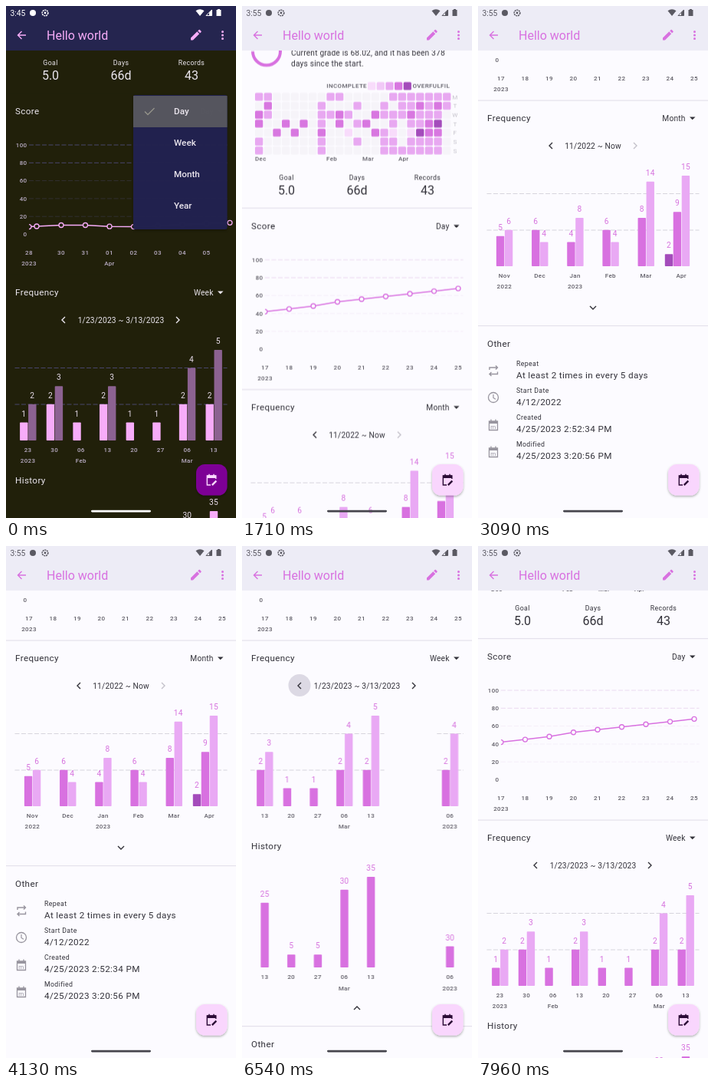
An HTML page that plays this animation: 300x667 px, repeating every 8 s.

```html
<!DOCTYPE html>
<html lang="en">
<head>
<meta charset="utf-8">
<title>Habit details</title>
<style>
  html, body { margin: 0; width: 100%; height: 100%; overflow: hidden; background: #fcfbff; }
  svg { display: block; width: 100vw; height: 100vh; font-family: Roboto, sans-serif; }
  .light { --bg: #fcfbff; --bar: #edecf6; --text: #33323a; --sub: #605e67; --pri: #d871e0; --pri2: #e9a9f4;
    --deep: #a44cbb; --line: #e4e1ec; --dash: #d3d1da; --score: #ead6ef; --fab: #f9d6fd; --ico: #2b0b36;
    --menu: #efedf7; --val: #d673de; --status: #5a5962; --pill: #45444c; --faint: #c4c1ca; }
  .dark { --bg: #21200a; --bar: #25254f; --text: #ebe6ee; --sub: #b9acc4; --pri: #f7acf9; --pri2: #8c6291;
    --deep: #d08be0; --line: #21200a; --dash: #4d4a78; --score: #4d4a78; --fab: #7d0595; --ico: #fbd9ff;
    --menu: #202050; --val: #e8dcea; --status: #ffffff; --pill: #ffffff; --faint: #6b6575; }
  text { fill: var(--text); }
  .title { font-size: 16px; fill: var(--pri); }
  .big { font-size: 16px; }
  .head { font-size: 11.7px; letter-spacing: .36px; }
  .item { font-size: 11.7px; font-weight: 500; }
  .body { font-size: 10.2px; letter-spacing: .18px; }
  .val { font-size: 10.2px; letter-spacing: .18px; fill: var(--val); }
  .label { font-size: 8.75px; letter-spacing: .36px; }
  .tiny { font-size: 8px; font-weight: 500; letter-spacing: .36px; fill: var(--sub); }
  .day { font-size: 8px; letter-spacing: .36px; fill: var(--faint); }
  .clock { font-size: 10.3px; fill: var(--status); }
</style>
</head>
<body>
<svg id="stage" viewBox="0 0 300 667" preserveAspectRatio="none">
  <defs>
    <clipPath id="plot"><rect x="11" y="280" width="278" height="420"/></clipPath>
    <clipPath id="scoreClip"><rect x="30" y="20" width="270" height="150"/></clipPath>
    <filter id="shadow" x="-20%" y="-20%" width="140%" height="150%">
      <feDropShadow dx="0" dy="1.5" stdDeviation="1.6" flood-color="#000" flood-opacity=".32"/>
    </filter>
  </defs>
</svg>
<script>
const LOOP = 8000, DARK_END = 860, PICK = 5690, SLIDE = 6352;
const SLIDE_WIDTH = 278, BAR_HEIGHT = 118, HISTORY_HEIGHT = 209;

const MONTHS = {
  names: ['Nov', 'Dec', 'Jan', 'Feb', 'Mar', 'Apr'], notes: { 0: '2022', 2: '2023' },
  counts: [[5, 6], [6, 4], [4, 8], [6, 4], [8, 14], [9, 15, 2]],
  totals: [55, 50, 60, 50, 110, 318]
};
const WEEKS_NOW = {
  names: ['06', '13', '20', '27', '03', '10', '17', '24'], notes: { 0: '2023', 4: 'Apr' },
  counts: [[2, 4], [2, 5], [1, 3], [2, 3], [2, 4, 1], [3, 4], [3, 3, 1], [2, 3]],
  totals: [30, 35, 20, 25, 129, 35, 129, 30]
};
const WEEKS_OLD = {
  names: ['23', '30', '06', '13', '20', '27', '06', '13'], notes: { 0: '2023', 2: 'Feb', 6: 'Mar' },
  counts: [[1, 2], [2, 3], [1], [2, 3], [1], [1], [2, 4], [2, 5]],
  totals: [15, 25, 5, 25, 5, 5, 30, 35]
};
const HEAT = [
  '2200000022000002222222',
  '0300000200020020223232',
  '3200000223200322232220',
  '3003030203023002022340',
  '0030300300100321014330',
  '2000000200020022022220',
  '2000000200000022222220'
];
const HEAT_COLORS = ['#f6f4f9', '#f8dcfb', '#e8a8f1', '#d877e0', '#a44cbb'];

function el(parent, tag, attrs = {}) {
  const node = document.createElementNS('http://www.w3.org/2000/svg', tag);
  for (const key in attrs) node.setAttribute(key, attrs[key]);
  return parent.appendChild(node);
}
const group = (parent, attrs) => el(parent, 'g', attrs);
const rect = (parent, x, y, width, height, fill, rx = 0) =>
  el(parent, 'rect', { x, y, width, height, fill, rx });
const circle = (parent, cx, cy, r, fill) => el(parent, 'circle', { cx, cy, r, fill });
const stroke = (parent, d, color, width = 1.3) =>
  el(parent, 'path', { d, fill: 'none', stroke: color, 'stroke-width': width });
const fill = (parent, d, color) => el(parent, 'path', { d, fill: color });
function label(parent, x, y, string, style, anchor = 'middle') {
  const node = el(parent, 'text', { x, y, dy: '.355em', class: style, 'text-anchor': anchor });
  node.textContent = string;
  return node;
}
const dashes = (parent, x, y, color, opacity = 1) => el(parent, 'path', {
  d: `M${x} ${y}H288.5`, stroke: color, 'stroke-width': .9, 'stroke-dasharray': '6 2.5', opacity
});

// steps: [time, value, easing to the next step]
function track(node, property, steps, easing = 'linear') {
  const first = steps[0], last = steps[steps.length - 1];
  const frames = [[0, first[1]], ...steps, [LOOP, last[1]]].map(([time, value, ease]) =>
    ({ offset: time / LOOP, [property]: value, easing: ease || easing }));
  node.animate(frames, { duration: LOOP, iterations: Infinity });
}
const fade = (node, steps) => track(node, 'opacity', steps);
const shiftY = (node, steps) =>
  track(node, 'transform', steps.map(([t, y, ease]) => [t, `translate(0px, ${y}px)`, ease]));
const shiftX = (node, steps) =>
  track(node, 'transform', steps.map(([t, x, ease]) => [t, `translate(${x}px, 0px)`, ease]));
const show = (node, from, to) =>
  track(node, 'opacity', [[0, from ? 0 : 1], [from, 1], [to, to < LOOP ? 0 : 1]], 'steps(1, end)');

function statusAndAppBar(parent, clock) {
  rect(parent, 0, 0, 300, 58, 'var(--bar)');
  label(parent, 5.5, 9.5, clock, 'clock', 'start');
  circle(parent, 35, 9, 4, 'var(--status)');
  el(parent, 'circle', { cx: 51, cy: 9, r: 3.8, fill: 'none', stroke: 'var(--status)',
    'stroke-width': 1.6, 'stroke-dasharray': '2 .8' });
  circle(parent, 51, 9, 1.4, 'var(--status)');
  fill(parent, 'M247.5 6.2Q253 2.5 258.5 6.2L253 13Z', 'var(--status)');
  stroke(parent, 'M261 12.5H268.5V5Z', 'var(--status)', 1);
  fill(parent, 'M265 8.5L268.5 5V12.5H265Z', 'var(--status)');
  fill(parent, 'M274.5 5H276V4H279V5H280.5V13H274.5Z', 'var(--status)');
  stroke(parent, 'M26 38H15.5M20.5 33L15.5 38L20.5 43', 'var(--pri)', 1.4);
  label(parent, 53, 38, 'Hello world', 'title', 'start');
  fill(parent, 'M241 44.5V41.6L249.3 33.3L252.2 36.2L243.9 44.5ZM250.2 32.4L251.6 31Q252.2 30.6 252.8 31L254.5 32.7Q255 33.3 254.5 33.9L253.1 35.3Z', 'var(--pri)');
  for (const y of [33.5, 38, 42.5]) circle(parent, 282.5, y, 1.5, 'var(--pri)');
}

function calendar(parent, x, y, color) {
  const g = group(parent, { transform: `translate(${x} ${y})` });
  stroke(g, 'M-5.5 -5H5.5V6.5H-5.5ZM-3 -7.5V-5M3 -7.5V-5', color, 1.3);
  rect(g, -5.5, -5, 11, 3, color);
  return g;
}

function floatingButton(parent) {
  const box = rect(parent, 248, 597, 40.5, 40.5, 'var(--fab)', 11.5);
  box.setAttribute('filter', 'url(#shadow)');
  stroke(parent, 'M267 624H262.3V612H273.8V616M265 609.8V612M271 609.8V612', 'var(--ico)', 1.4);
  rect(parent, 262, 611.5, 12, 3.5, 'var(--ico)');
  stroke(parent, 'M268.8 624.2L274.3 618.7', 'var(--ico)', 2.4);
  rect(parent, 111, 656.7, 78, 2.8, 'var(--pill)', 1.4);
}

function dropdown(parent, y, name) {
  const g = group(parent);
  label(g, 270.5, y, name, 'body', 'end');
  fill(g, `M276 ${y - 1.5}H283.5L279.7 ${y + 2.3}Z`, 'var(--text)');
  return g;
}

function rangeRow(parent, name, left, right, nextColor = 'var(--text)') {
  const g = group(parent), y = 272;
  label(g, 150, y, name, 'body');
  stroke(g, `M${left + 2} ${y - 4}l-4 4l4 4`, 'var(--text)', 1.4);
  stroke(g, `M${right - 2} ${y - 4}l4 4l-4 4`, nextColor, 1.4);
  return g;
}

function heatMap(parent) {
  stroke(parent, 'M32 -245.5a18 18 0 1 1 -18 18', 'var(--pri)', 4);
  stroke(parent, 'M14 -227.5a18 18 0 0 1 18 -18', '#ecdcf2', 4);
  label(parent, 64, -226, 'Current grade is 68.02, and it has been 378', 'body', 'start');
  label(parent, 64, -211.5, 'days since the start.', 'body', 'start');
  label(parent, 163, -182.5, 'INCOMPLETE', 'tiny', 'end');
  label(parent, 222.5, -182.5, 'OVERFULFIL', 'tiny', 'start');
  ['#f8dcfb', '#f1c8f7', '#e8a8f1', '#d877e0', '#a44cbb'].forEach((color, i) =>
    rect(parent, 164 + i * 11.67, -187.5, 10.2, 10.2, color, 1.5));
  HEAT.forEach((row, r) => {
    [...row].forEach((level, c) =>
      rect(parent, 17 + c * 11.67, -173.5 + r * 11.67, 10.3, 10.3, HEAT_COLORS[level], 1.5));
    label(parent, 278, -168.3 + r * 11.67, 'MTWTFSS'[r], 'day');
  });
  [[17, 'Dec'], [110, 'Feb'], [157, 'Mar'], [204, 'Apr']].forEach(([x, name]) =>
    label(parent, x, -87.5, name, 'tiny', 'start'));
}

function stats(parent) {
  [[58, 'Goal', '5.0'], [150, 'Days', '66d'], [242, 'Records', '43']].forEach(([x, name, value]) => {
    label(parent, x, -63.5, name, 'label');
    label(parent, x, -47, value, 'big');
  });
}

function scoreChart(parent, points, names, notes) {
  const yOf = value => 160.5 - value * 1.165;
  label(parent, 12, 0, 'Score', 'head', 'start');
  for (let v = 0; v <= 100; v += 20) {
    if (v) dashes(parent, 30, yOf(v), 'var(--score)', v > 60 ? 1 : .4);
    label(parent, 27.5, yOf(v), v, 'tiny', 'end');
  }
  const plot = group(parent, { 'clip-path': 'url(#scoreClip)' });
  stroke(plot, 'M' + points.map(([x, v]) => `${x} ${yOf(v)}`).join('L'), 'var(--pri)', 1.5);
  for (const [x, v] of points) {
    const dot = circle(plot, x, yOf(v), 3, 'var(--bg)');
    dot.setAttribute('stroke', 'var(--pri)');
    dot.setAttribute('stroke-width', 1.3);
  }
  names.forEach(([x, name]) => label(parent, x, 184, name, 'tiny'));
  notes.forEach(([x, name]) => label(parent, x, 198.5, name, 'tiny'));
}

function bar(parent, x, base, value, max, color) {
  const height = value / max * BAR_HEIGHT;
  rect(parent, x - 5.2, base - height, 10.4, height, color, .8);
  label(parent, x, base - height - 11.5, value, 'val');
}

// Draws both bar charts for one span of time.
function panel(parent, { names, notes, counts, totals }) {
  const g = group(parent), step = 277 / names.length;
  const topCount = Math.max(...counts.flat()), topTotal = Math.max(...totals);
  dashes(g, 11.5, 334.5, 'var(--dash)');
  dashes(g, 11.5, 382, 'var(--dash)');
  names.forEach((name, i) => {
    const x = 11.3 + (i + .5) * step;
    [['var(--pri)', -5.3], ['var(--pri2)', 5.7], ['var(--deep)', -16.2]].forEach(([color, dx], k) => {
      if (counts[i][k]) bar(g, x + dx, 429, counts[i][k], topCount, color);
    });
    bar(g, x, 639, totals[i], topTotal, 'var(--pri)');
    for (const y of [441, 651.5]) {
      label(g, x, y, name, 'tiny');
      if (notes[i]) label(g, x, y + 14.3, notes[i], 'tiny');
    }
  });
  return g;
}

function otherSection(parent) {
  rect(parent, 0, 468, 300, 800, 'var(--bg)');
  rect(parent, 0, 506, 300, 1.2, 'var(--line)');
  label(parent, 12, 530, 'Other', 'head', 'start');
  [['Repeat', 'At least 2 times in every 5 days'], ['Start Date', '4/12/2022'],
   ['Created', '4/25/2023 2:52:34 PM'], ['Modified', '4/25/2023 3:20:56 PM']].forEach(([name, value], i) => {
    label(parent, 50, 556 + i * 35, name, 'label', 'start');
    label(parent, 50, 570.5 + i * 35, value, 'head', 'start');
  });
  const gray = '#98959f';
  stroke(parent, 'M15 564V561H25M23 558.5L25.5 561L23 563.5M25.5 566.5V569.5H15.5M17.5 567L15 569.5L17.5 572', gray, 1.4);
  el(parent, 'circle', { cx: 20, cy: 600, r: 6.5, fill: 'none', stroke: gray, 'stroke-width': 1.3 });
  stroke(parent, 'M20 596V600.4L23 602.2', gray, 1.2);
  for (const y of [636, 671]) {
    const icon = calendar(parent, 20, y, gray);
    label(icon, 0, 2.2, 'm', 'day').style.fill = gray;
  }
}

function menu(parent, top, names) {
  const g = group(parent), height = names.length * 41 + 11;
  rect(g, 166, top, 122.5, height, 'var(--menu)', 2.5).setAttribute('filter', 'url(#shadow)');
  const rows = group(g);
  names.forEach((name, i) => label(g, 219, top + 26 + i * 41 - (height > 150 ? 5 : 0), name, 'item', 'start'));
  return { g, rows };
}
const check = (parent, y, color) => stroke(parent, `M181 ${y}l4 4l8.5 -8.5`, color, 1.3);

function screen(theme) {
  const root = group(stage, { class: theme });
  rect(root, 0, 0, 300, 667, 'var(--bg)');
  const page = group(root);
  const plot = group(page, { 'clip-path': 'url(#plot)' });
  stats(page);
  rect(page, 0, -24, 300, 1.2, 'var(--line)');
  rect(page, 0, 212.5, 300, 1.2, 'var(--line)');
  label(page, 12, 236, 'Frequency', 'head', 'start');
  label(page, 12, 481, 'History', 'head', 'start');
  return { root, page, plot };
}

function darkScreen() {
  const { root, page, plot } = screen('dark');
  page.setAttribute('transform', 'translate(0 137)');
  const xs = [40, 72, 103.5, 135, 166.5, 198, 230, 261.5];
  const values = [9, 10.3, 10.3, 8.9, 8.5, 9.5, 11, 12];
  scoreChart(page, [[30, 8.5], ...xs.map((x, i) => [x, values[i]]), [292, 13]],
    [[30, '28'], ...['30', '31', '01', '02', '03', '04', '05'].map((d, i) => [xs[i + 1], d])],
    [[30, '2023'], [135, 'Apr']]);
  dropdown(page, 0, 'Day');
  dropdown(page, 236, 'Week');
  rangeRow(page, '1/23/2023 ~ 3/13/2023', 75, 224);
  panel(plot, WEEKS_OLD);
  statusAndAppBar(root, '3:45');
  floatingButton(root);
  const { g, rows } = menu(root, 116, ['Day', 'Week', 'Month', 'Year']);
  rect(rows, 166, 117, 122.5, 41, '#56565f');
  check(rows, 137.5, '#96958c');
  fade(g, [[0, 1], [60, .95], [260, 0]]);
  show(root, 0, DARK_END);
}

function lightScreen() {
  const { root, page, plot } = screen('light');
  heatMap(page);
  const xs = Array.from({ length: 9 }, (_, i) => 30 + i * 31.5);
  scoreChart(page, [42, 45, 48.3, 53, 56, 59, 62, 65, 68].map((v, i) => [xs[i], v]),
    xs.map((x, i) => [x, 17 + i]), [[30, '2023']]);
  dropdown(page, 0, 'Day');
  show(dropdown(page, 236, 'Month'), 0, PICK);
  show(dropdown(page, 236, 'Week'), PICK, LOOP);

  const ripple = circle(page, 75, 271.5, 14.5, '#dcd9e4');
  fade(ripple, [[6260, 0], [6360, 1], [6560, 1], [6760, 0]]);
  show(rangeRow(page, '11/2022 ~ Now', 95, 205, 'var(--faint)'), 0, PICK);
  show(rangeRow(page, '3/6/2023 ~ Now', 93, 207, 'var(--faint)'), PICK, SLIDE);
  show(rangeRow(page, '1/23/2023 ~ 3/13/2023', 75, 224), SLIDE, LOOP);

  const [older, recent, months] = [WEEKS_OLD, WEEKS_NOW, MONTHS].map(data => panel(plot, data));
  fade(months, [[PICK, 1], [PICK + 250, 0]]);
  fade(recent, [[PICK, 0], [PICK + 250, 1]]);
  shiftX(recent, [[SLIDE, 0, 'cubic-bezier(.25,.46,.45,.94)'], [SLIDE + 300, SLIDE_WIDTH]]);
  shiftX(older, [[SLIDE, -SLIDE_WIDTH], [SLIDE + 300, 0]]);

  const lower = group(page);
  otherSection(lower);
  show(stroke(lower, 'M146 481l4 4l4 -4', 'var(--text)', 1.4), 0, 4450);
  show(stroke(lower, 'M146 485l4 -4l4 4', 'var(--text)', 1.4), 4450, LOOP);
  shiftY(lower, [[4450, 0, 'ease-in-out'], [4750, HISTORY_HEIGHT]]);

  shiftY(page, [[1400, 330, 'ease-in'], [1710, 287], [2500, -11, 'ease-out'], [2900, -90],
    [6850, -90, 'cubic-bezier(.4,0,.5,1)'], [7960, 144]]);

  statusAndAppBar(root, '3:55');
  floatingButton(root);
  const { g, rows } = menu(root, 79.5, ['Week', 'Month', 'Year']);
  rect(rows, 166, 126, 122.5, 41, '#dcdae3');
  check(rows, 146.5, '#77757e');
  const picked = group(rows);
  rect(picked, 166, 85, 122.5, 41, '#e1dfe9');
  check(picked, 105.5, '#aaa8b0');
  fade(picked, [[5560, 0], [5700, 1]]);
  fade(g, [[5200, 0], [5380, 1], [5790, 1], [5960, 0]]);
  show(root, DARK_END, LOOP);
}

const stage = document.getElementById('stage');
darkScreen();
lightScreen();
</script>
</body>
</html>
```
